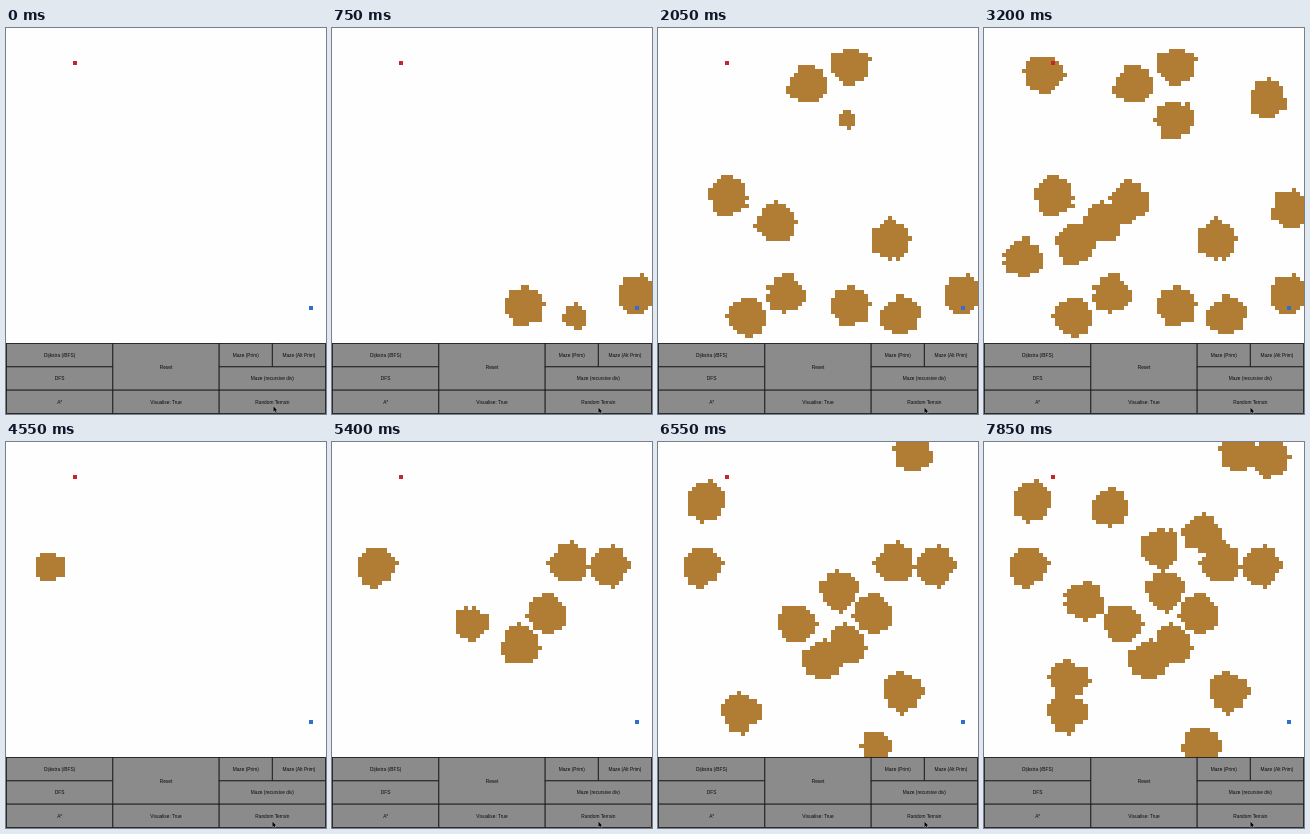
An HTML page that plays this animation: 320 by 386 pixels, repeating every 8000 ms.

```html
<!DOCTYPE html>
<html lang="en">
<head>
<meta charset="utf-8">
<title>Random terrain</title>
<style>
  html, body { margin: 0; width: 100%; height: 100%; overflow: hidden; background: #fefefe; }
  svg { display: block; width: 100vw; height: 100vh; }
  text { font: 4.8px "Liberation Sans", Arial, sans-serif; text-anchor: middle; fill: #0a0a0a; }
</style>
</head>
<body>
<svg viewBox="0 0 320 386">
  <defs><clipPath id="field"><rect width="320" height="315"/></clipPath></defs>
  <rect width="320" height="386" fill="#fefefe"/>
  <path id="land" fill="#b17c33" clip-path="url(#field)" shape-rendering="crispEdges"/>
  <rect x="67" y="33" width="4" height="4" fill="#c6262b"/>
  <rect x="303" y="278" width="4" height="4" fill="#2f6fd0"/>
  <g id="panel"></g>
  <path id="cursor" d="M0 0V6L1.4 4.8L2.5 7.2L3.5 6.7L2.5 4.4H4.3Z" fill="#000" stroke="#ddd" stroke-width=".3"/>
</svg>
<script>
const LOOP = 8000, STEP = 50;
const CELL = 4.08, OX = 1.5, OY = 0.4;
const RADIUS = 21, RATE = 0.3; // island size in px, islands grown per step
const land = document.getElementById('land');
const cursor = document.getElementById('cursor');

// Island centres in order of growth
const scenes = [
  { start: 350, centres: [
    [305, 267], [192, 278], [243, 288], [192, 38], [70, 169], [149, 57],
    [88, 289], [232, 212], [128, 266], [118, 194], [190, 92], [283, 71],
    [60, 46], [91, 218], [39, 231], [146, 174], [307, 181]] },
  { start: 4450, centres: [
    [44, 125], [237, 121], [277, 124], [215, 171], [188, 202], [139, 182],
    [254, 11], [82, 271], [182, 149], [164, 218], [245, 250], [48, 60],
    [218, 304], [126, 65], [101, 159], [285, 16], [176, 106], [219, 92], [84, 238]] }
];

function noise(a, b) {
  const n = Math.sin(a * 127.1 + b * 311.7) * 43758.5453;
  return n - Math.floor(n);
}

const colX = col => Math.round(col * CELL + OX);
const rowY = row => Math.round(row * CELL + OY);

// Ragged disc spreading from its middle; its area grows with the share
function island([cx, cy], share) {
  const reach = Math.sqrt(share);
  const phase = noise(cx, cy) * 2 * Math.PI;
  const midCol = Math.floor((cx - OX) / CELL), midRow = Math.floor((cy - OY) / CELL);
  let d = '';
  for (let row = midRow - 5; row <= midRow + 5; row++) {
    for (let col = midCol - 5; col <= midCol + 5; col++) {
      const u = ((col + .5) * CELL + OX - cx) / RADIUS;
      const v = ((row + .5) * CELL + OY - cy) / RADIUS;
      const wobble = 1 + .04 * Math.sin(3 * Math.atan2(v, u) + phase);
      const dist = (Math.abs(u) ** 1.8 + Math.abs(v) ** 1.8) ** (1 / 1.8);
      if (dist * wobble * (1 + .22 * noise(col, row)) > reach * 1.04) continue;
      d += `M${colX(col)} ${rowY(row)}H${colX(col + 1)}V${rowY(row + 1)}H${colX(col)}Z`;
    }
  }
  return d;
}

function terrain({ start, centres }, t) {
  const grown = (t - start) / STEP * RATE;
  return centres.map((c, i) => grown > i ? island(c, Math.min(1, grown - i)) : '').join('');
}

// Button grid: six columns by three rows
function button(col, row, cols, rows, label) {
  const w = 319 / 6, h = 70 / 3;
  const x = .5 + col * w, y = 315.5 + row * h;
  return `<rect x="${x}" y="${y}" width="${cols * w}" height="${rows * h}" fill="#8b8b8b" stroke="#1c1c1c" stroke-width=".9"/>` +
    `<text x="${x + cols * w / 2}" y="${y + rows * h / 2 + 1.8}">${label}</text>`;
}

document.getElementById('panel').innerHTML = [
  [0, 0, 2, 1, 'Dijkstra (/BFS)'],
  [0, 1, 2, 1, 'DFS'],
  [0, 2, 2, 1, 'A*'],
  [2, 0, 2, 2, 'Reset'],
  [2, 2, 2, 1, 'Visualise: True'],
  [4, 0, 1, 1, 'Maze (Prim)'],
  [5, 0, 1, 1, 'Maze (Alt Prim)'],
  [4, 1, 2, 1, 'Maze (recursive div)'],
  [4, 2, 2, 1, 'Random Terrain']
].map(b => button(...b)).join('');

let shown = -1;
function draw(tick) {
  if (tick === shown) return;
  shown = tick;
  const t = tick * STEP;
  const scene = scenes[t < scenes[1].start ? 0 : 1];
  land.setAttribute('d', terrain(scene, t));
  cursor.setAttribute('transform', t < STEP ? 'translate(267.3 378)' : 'translate(266.3 379.3)');
}

const start = performance.now();
function frame() {
  draw(Math.floor((performance.now() - start) % LOOP / STEP));
  requestAnimationFrame(frame);
}
frame();
</script>
</body>
</html>
```
